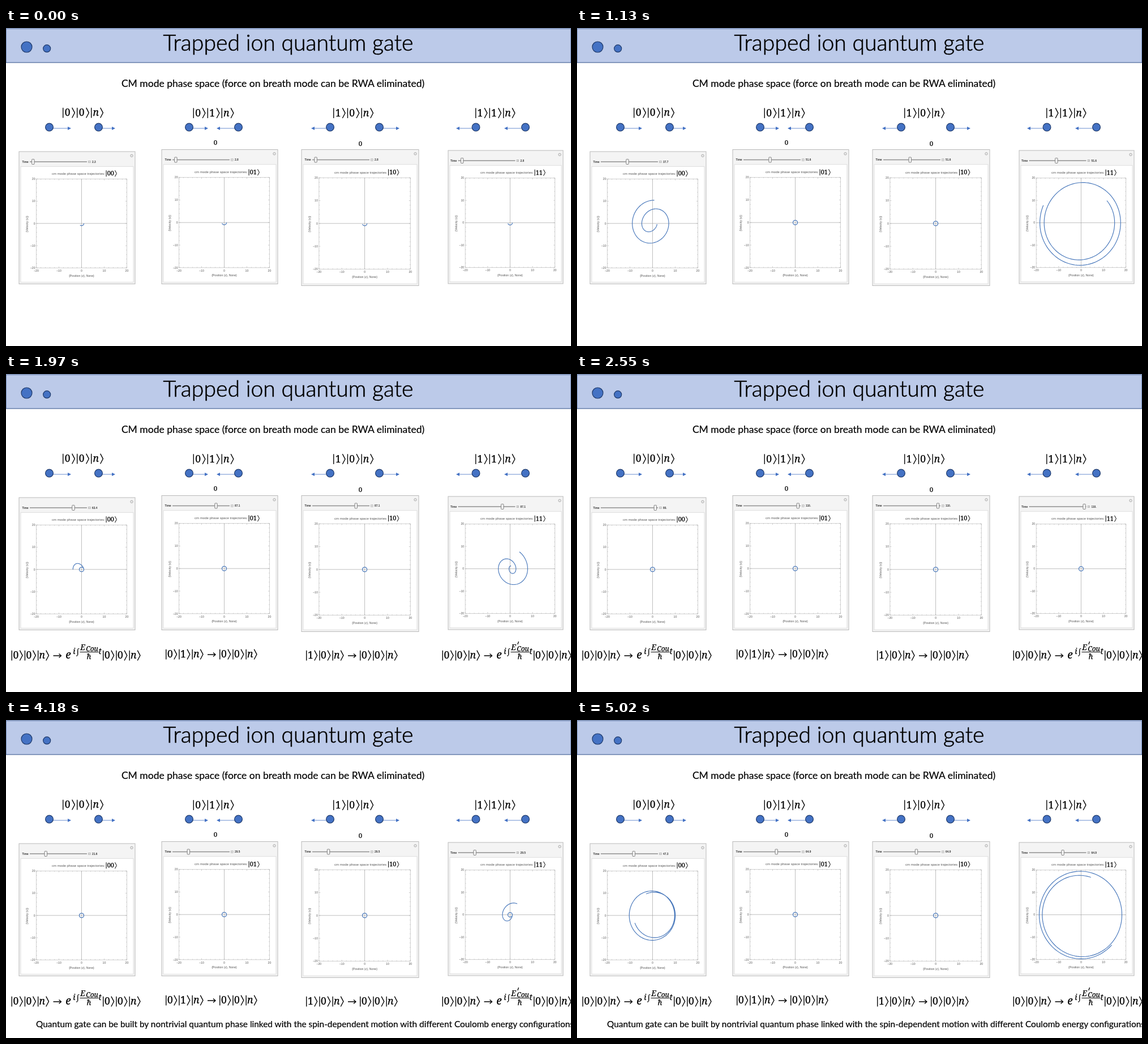
Recreate the animation shown at these times as an HTML page. Size 998x561 px, loop 5100 ms.

```html
<!DOCTYPE html>
<html lang="en">
<head>
<meta charset="utf-8">
<title>Trapped ion quantum gate</title>
<style>
  html, body { margin: 0; width: 100%; height: 100%; overflow: hidden; background: #fff; }
  svg { display: block; width: 998px; height: 561px; }
  .slide { font-family: Lato, "Open Sans", sans-serif; stroke: #000; stroke-width: .2px; }
  .heading { font-size: 39.2px; font-weight: 300; stroke-width: .6px; }
  .math { font-family: "Noto Serif", "Liberation Serif", serif; text-anchor: middle; stroke: #000; stroke-width: .25px; }
  .it { font-style: italic; }
  .plot { font-family: "Liberation Sans", Arial, sans-serif; font-size: 5.2px; fill: #555; }
  .bold { font-weight: 700; font-size: 4.8px; fill: #333; }
  .mid { text-anchor: middle; }
  .end { text-anchor: end; }
  .stroke { fill: none; stroke: #000; }
  .ion { fill: #4472c4; stroke: #1f3a6b; stroke-width: 1.2; }
  .arrow { fill: #4472c4; stroke: #4472c4; stroke-width: .8; }
  .axis { fill: none; stroke: #a4a4a4; stroke-width: .7; }
  .curve { fill: none; stroke: #4676ba; stroke-width: 1.15; stroke-linejoin: round; }
</style>
</head>
<body>
<svg id="stage" viewBox="0 0 998 561"></svg>
<script>
const stage = document.getElementById('stage');
const LOOP = 5100, TICK = 41.8, TICKS_PER_STEP = 2.439, REPLAY = 83, REPLAY_START = 85.3;
const FORMULAS_AT = 41, CAPTION_AT = 82;
const FORCE_START = 25, WINDOW = 10;

// drive: frequency of the applied force, 0 for no net force
const panels = [
  { x: 23,  y: 218,   w: 205, h: 233.5, state: '00', title: [81, 258.5],  ket: [176, 260],   first: 2.3,   step: 3.216, last: 80,  drive: 1.2, dx: 0 },
  { x: 275, y: 214.5, w: 205, h: 237,   state: '01', title: [333, 256],   ket: [428, 258],   first: 2.845, step: 4.435, last: 110, drive: 0,   dx: 0 },
  { x: 522, y: 214.5, w: 207, h: 240,   state: '10', title: [580, 256.5], ket: [674.5, 258], first: 2.845, step: 4.435, last: 110, drive: 0,   dx: 0 },
  { x: 781, y: 216,   w: 203, h: 235,   state: '11', title: [838, 256.5], ket: [933, 258.5], first: 2.845, step: 4.435, last: 110, drive: 1.1, dx: -1.5 }
];

const text = (x, y, str, cls = '', size = '') =>
  `<text x="${x}" y="${y}" class="${cls}"${size && ` style="font-size:${size}px"`}>${str}</text>`;
const rect = (x, y, w, h, fill, stroke, sw = 1) =>
  `<rect x="${x}" y="${y}" width="${w}" height="${h}" fill="${fill}" stroke="${stroke}" stroke-width="${sw}"/>`;
const ion = (x, y, r) => `<circle class="ion" cx="${x}" cy="${y}" r="${r}"/>`;

function arrow(from, to, y = 177) {
  const back = to - 6 * Math.sign(to - from);
  return `<path class="arrow" d="M${from} ${y}H${back}"/>` +
    `<path fill="#4472c4" d="M${to} ${y}L${back} ${y - 3}V${y + 3}Z"/>`;
}

function kets(x, y, size, pitch, labels) {
  return labels.map((label, i) => {
    const left = x + i * pitch + .1 * size, right = x + (i + 1) * pitch - .42 * size;
    const top = y - .82 * size, bottom = y + .2 * size;
    return `<path class="stroke" stroke-width="${.4 + size * .055}" d="M${left} ${top}V${bottom}` +
      `M${right} ${top}L${right + .27 * size} ${(top + bottom) / 2}L${right} ${bottom}"/>` +
      text((left + right) / 2, y, label, label === 'n' ? 'math it' : 'math', size);
  }).join('');
}

const rightArrow = (x, y) =>
  `<path class="stroke" stroke-width="1.3" d="M${x} ${y}h14m-4 -3.5l4 3.5l-4 3.5"/>`;

function formula(x, y, state, phase) {
  let out = kets(x, y, 17.5, 23.2, [...state, 'n']) + rightArrow(x + 75, y - 5);
  if (phase) {
    out += text(x + 101.5, y, 'e', 'math it', 19) +
      text(x + 112, y - 8, 'i', 'math it', 14) +
      text(x + 118.5, y - 8, '∫', 'math', 14) +
      text(x + 127, y - 15, 'E', 'math it', 14) +
      text(x + 143.5, y - 13, 'Cou', 'math it', 12) +
      `<path class="stroke" d="M${x + 122} ${y - 11.5}h33"/>` +
      text(x + 138, y + 1, 'ħ', 'math it', 13) +
      text(x + 157.5, y - 8, 't', 'math it', 14);
    if (phase === 'prime') {
      out += `<path class="stroke" stroke-width="1.3" d="M${x + 136} ${y - 30}l-1.7 5"/>`;
    }
  }
  return out + kets(x + (phase ? 161.5 : 95), y, 17.5, 23.2, ['0', '0', 'n']);
}

function panel(p) {
  const left = p.x + p.w * .149, right = p.x + p.w * .929;
  const top = p.y + p.h * .207, bottom = p.y + p.h * .879;
  p.cx = (left + right) / 2;
  p.cy = (top + bottom) / 2;
  p.ux = (right - left) / 40;
  p.uy = (bottom - top) / 40;
  const sx = p.x + p.dx, sy = p.y + 18;

  let ticks = '', labels = '';
  for (let v = -20; v <= 20; v += 2) {
    const len = v % 10 ? 1.3 : 2.5, px = p.cx + v * p.ux, py = p.cy - v * p.uy;
    ticks += `M${px} ${bottom}v${-len}M${px} ${top}v${len}M${left} ${py}h${len}M${right} ${py}h${-len}`;
    if (v % 10) continue;
    const name = String(v).replace('-', '–');
    labels += text(px, bottom + 6.7, name, 'mid') + text(left - 2, py + 1.8, name, 'end');
  }
  const vx = left - 14.5, vy = p.cy + 1;
  const title = 'cm mode phase space trajectories' + (p.state === '10' ? '' : ':');

  return `<g class="plot">` +
    rect(p.x, p.y, p.w, p.h, '#f4f4f4', '#b9b9b9') +
    rect(p.x + 3, p.y + 26.3, p.w - 6, p.h - 29.5, '#fff', '#d8d8d8', .8) +
    `<circle cx="${p.x + p.w - 6}" cy="${p.y + 7.3}" r="2.2" fill="#eee" stroke="#999" stroke-width=".8"/>` +
    text(sx + 5.5, sy + 1.7, 'Time', 'bold') +
    `<path stroke="#8f8f8f" stroke-width="1.3" d="M${sx + 19} ${sy}h101"/>` +
    rect(sx + 122.7, sy - 1.7, 3.4, 3.4, '#f4f4f4', '#999', .6) +
    `<path stroke="#999" stroke-width=".6" d="M${sx + 123.4} ${sy}h2"/>` +
    `<rect class="handle" y="${sy - 4.5}" width="4.4" height="9" rx=".8" fill="#f6f6f6" stroke="#777" stroke-width=".9"/>` +
    text(sx + 129, sy + 1.7, '', 'bold value') +
    text(...p.title, title, '', 6.06) +
    `<path class="axis" stroke-opacity=".75" d="M${left} ${top}H${right}V${bottom}H${left}Z${ticks}"/>` +
    `<path class="axis" d="M${left} ${p.cy}H${right}M${p.cx} ${top}V${bottom}"/>` +
    labels +
    text(p.cx, bottom + 15.3, '{Position (z), None}', 'mid') +
    `<text class="mid" transform="translate(${vx} ${vy}) rotate(-90)">{Velocity (v)}</text>` +
    `<path class="curve"/></g>` +
    kets(...p.ket, 10.8, 21, [p.state]);
}

stage.innerHTML =
  rect(0, 1, 998, 60, '#bccae9', '#2f4f88') +
  ion(36.5, 33.5, 9.5) + ion(72.2, 36.2, 6.5) +
  text(498.5, 39.5, 'Trapped ion quantum gate', 'slide heading mid') +
  text(471.5, 104, 'CM mode phase space (force on breath mode can be RWA eliminated)', 'slide mid', 17.5) +
  kets(99, 155, 17.5, 25, ['0', '0', 'n']) +
  kets(329.5, 155.5, 17.5, 25, ['0', '1', 'n']) +
  kets(577, 155.5, 17.5, 24.7, ['1', '0', 'n']) +
  kets(828, 155.5, 17.5, 24.5, ['1', '1', 'n']) +
  arrow(83, 115) + arrow(170, 193) + arrow(330, 357) + arrow(404, 372) +
  arrow(565, 539) + arrow(666, 695) + arrow(823, 795) + arrow(910, 880) +
  [76.5, 163.5, 323.5, 410.5, 572.5, 659.5, 830, 917.5].map(x => ion(x, 175, 6.9)).join('') +
  text(370, 206, '0', 'math', 11.5) + text(626, 208, '0', 'math', 11.5) +
  panels.map(panel).join('') +
  `<g id="formulas">` + formula(8.5, 502, '00', 'plain') + formula(281, 500, '01') +
  formula(529, 502, '10') + formula(769.5, 502, '00', 'prime') + `</g>` +
  `<g id="caption">` + text(53, 541.5, 'Quantum gate can be built by nontrivial quantum phase linked with ' +
    'the spin-dependent motion with different Coulomb energy configurations', 'slide', 15.4) + `</g>`;

const all = name => [...stage.querySelectorAll(name)];
const curves = all('.curve'), handles = all('.handle'), values = all('.value');
const formulas = document.getElementById('formulas'), caption = document.getElementById('caption');

// Oscillator z'' + z = 2 cos(drive t), the force lasting one full beat
function motion(t, drive) {
  let z = Math.cos(t), v = -Math.sin(t);
  const s = t - FORCE_START;
  if (drive && s > 0 && s < 2 * Math.PI / (drive - 1)) {
    const gain = 2 / (1 - drive * drive), phase = drive * FORCE_START;
    const a = Math.cos(phase), b = drive * Math.sin(phase);
    z += gain * (Math.cos(drive * t) - a * Math.cos(s) + b * Math.sin(s));
    v += gain * (-drive * Math.sin(drive * t) + a * Math.sin(s) + b * Math.cos(s));
  }
  return [z, v];
}

function trail(p, end) {
  const start = Math.max(0, end - WINDOW), count = 200;
  const points = Array.from({ length: count + 1 }, (_, i) => {
    const [z, v] = motion(start + (end - start) * i / count, p.drive);
    return (p.cx + z * p.ux).toFixed(2) + ' ' + (p.cy - v * p.uy).toFixed(2);
  });
  return 'M' + points.join('L');
}

let shownStep = -1;
function draw() {
  const tick = Math.floor(performance.now() % LOOP / TICK);
  const begin = tick >= REPLAY ? REPLAY_START : 0;
  const step = Math.min(25, Math.max(0, Math.floor((tick - begin) / TICKS_PER_STEP)));
  formulas.style.display = tick >= FORMULAS_AT ? '' : 'none';
  caption.style.display = tick >= CAPTION_AT ? '' : 'none';
  if (step !== shownStep) {
    shownStep = step;
    panels.forEach((p, i) => {
      const t = Math.min(p.last, p.first + p.step * step);
      curves[i].setAttribute('d', trail(p, t));
      handles[i].setAttribute('x', p.x + p.w * .1137 + (t - 1) / (p.last - 1) * 92 - 2.2);
      values[i].textContent = t.toFixed(1).replace(/\.0$/, '.');
    });
  }
  requestAnimationFrame(draw);
}
draw();
</script>
</body>
</html>
```
